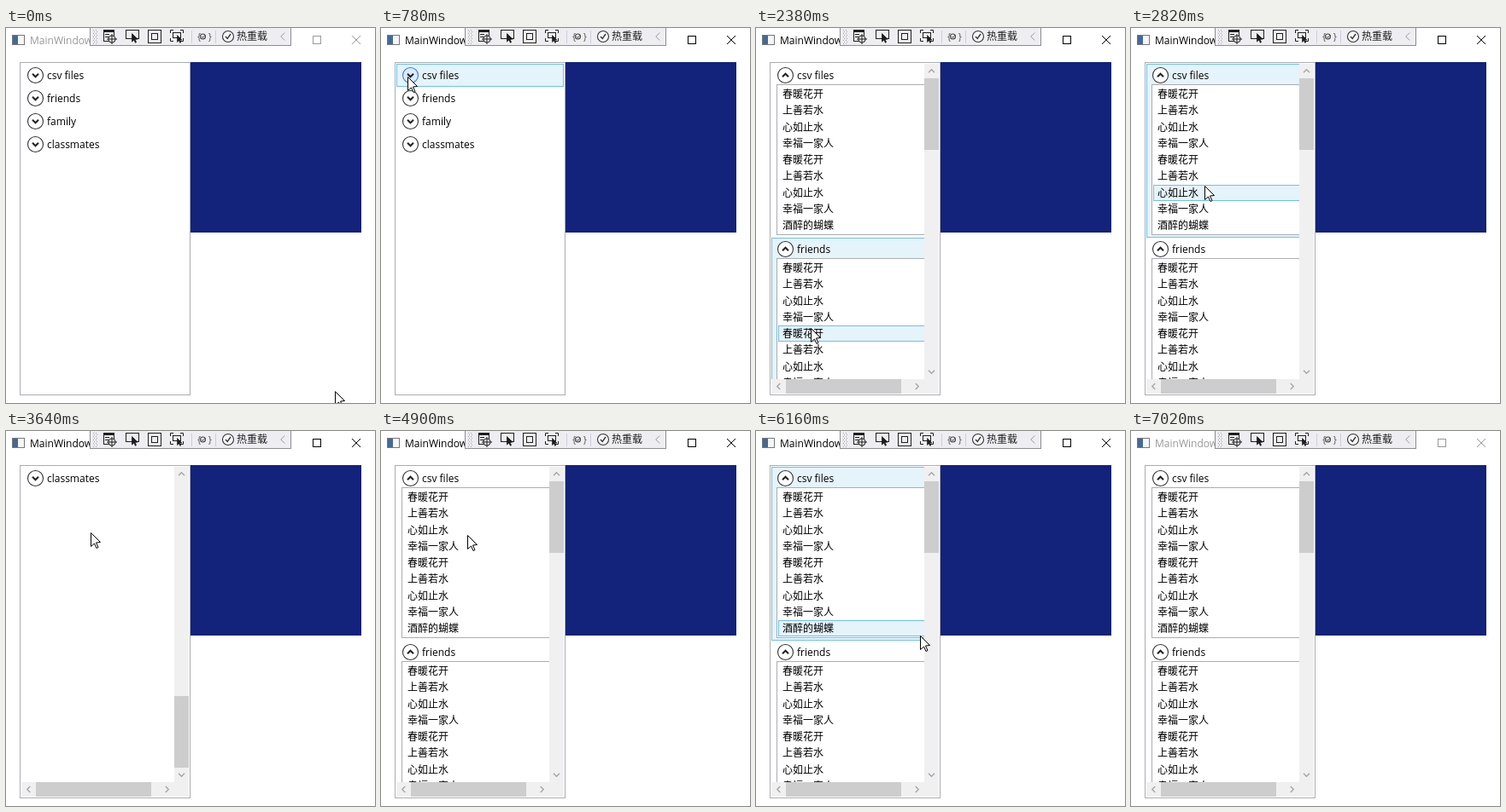
These frames come from a looping animation (432x440 px, 7070 ms). An HTML page with a canvas:

```html
<!DOCTYPE html>
<html lang="zh">
<head>
<meta charset="utf-8">
<title>Expanding lists</title>
<style>
  html, body { margin: 0; width: 100%; height: 100%; overflow: hidden; background: #fff; }
  canvas { display: block; width: 432px; height: 440px; }
</style>
</head>
<body>
<canvas id="stage"></canvas>
<script>
const W = 432, H = 440, LOOP = 7070;
const canvas = document.getElementById('stage');
const ctx = canvas.getContext('2d');
const dpr = window.devicePixelRatio || 1;
canvas.width = W * dpr;
canvas.height = H * dpr;

const LATIN = '12px "Open Sans", sans-serif';
const HAN = '12px "Noto Sans CJK SC", "Noto Sans CJK", sans-serif';
const INK = '#1e1e1e', EDGE = '#abadb3';
const GROUPS = ['csv files', 'friends', 'family', 'classmates'];
const NAMES = ['春暖花开', '上善若水', '心如止水', '幸福一家人'];
const ROWS = [...NAMES, ...NAMES, '酒醉的蝴蝶'];

const LEFT = 18, TOP = 42, RIGHT = 214, BOTTOM = 429;
const BAR = 17, CLOSED = 27, OPEN = 204, ROW = 19.28;
const UP = 0, EAST = Math.PI / 2, DOWN = Math.PI, WEST = -EAST;

// Pointer moves: begin, end, x, y
const MOVES = [
  [20, 500, 31, 57],
  [930, 1350, 37, 265],
  [2040, 2380, 64, 352],
  [2380, 2750, 86, 187],
  [2750, 3370, 99, 119],
  [4250, 4340, 101, 122],
  [4930, 5090, 101, 129],
  [5960, 6460, 357, 442]
];

const between = (t, a, b) => t >= a && t < b;

function pointerAt(t) {
  let x = 385, y = 426;
  for (const [begin, end, toX, toY] of MOVES) {
    const u = Math.min(1, Math.max(0, (t - begin) / (end - begin)));
    const k = u * u * (3 - 2 * u);
    x += (toX - x) * k;
    y += (toY - y) * k;
  }
  return { x: Math.round(x), y: Math.round(y) };
}

function stateAt(t) {
  return {
    active: between(t, 680, 7020),
    open: [t >= 850, t >= 1520, false, false],
    bars: t >= 1520,
    first: between(t, 3640, 4900) || between(t, 5330, 5610) ? 3 : 0,
    pressed: between(t, 720, 850) || between(t, 1450, 1520),
    // Hover lags one beat behind a wheel scroll
    stale: between(t, 4900, 4930) || between(t, 5610, 5640),
    pointer: pointerAt(t)
  };
}

function fill(color, x, y, w, h) {
  ctx.fillStyle = color;
  ctx.fillRect(x, y, w, h);
}

function frame(color, x, y, w, h) {
  ctx.strokeStyle = color;
  ctx.lineWidth = 1;
  ctx.strokeRect(x + 0.5, y + 0.5, w - 1, h - 1);
}

function line(color, width, ...p) {
  ctx.strokeStyle = color;
  ctx.lineWidth = width;
  ctx.beginPath();
  for (let i = 0; i < p.length; i += 2) ctx.lineTo(p[i], p[i + 1]);
  ctx.stroke();
}

function circle(x, y, r, color, inside = 'transparent') {
  ctx.beginPath();
  ctx.arc(x, y, r, 0, Math.PI * 2);
  ctx.fillStyle = inside;
  ctx.fill();
  ctx.strokeStyle = color;
  ctx.lineWidth = 1.1;
  ctx.stroke();
}

function text(str, x, y, font, color = '#000') {
  ctx.font = font;
  ctx.fillStyle = color;
  ctx.fillText(str, x, y);
}

function chevron(x, y, turn, size, color, width) {
  ctx.save();
  ctx.translate(x, y);
  ctx.rotate(turn);
  line(color, width, -size, size / 2, 0, -size / 2, size, size / 2);
  ctx.restore();
}

function check(x, y, size, color) {
  line(color, size / 2.2, x - size, y, x - size / 4, y + size * 0.8, x + size, y - size);
}

function arrow(x, y, scale, inside) {
  ctx.save();
  ctx.translate(x + 0.5, y + 0.5);
  ctx.scale(scale, scale);
  ctx.beginPath();
  for (const [px, py] of [[0, 0], [0, 16], [4, 12.5], [6.5, 18], [8.5, 17], [6, 11.5], [11, 11]])
    ctx.lineTo(px, py);
  ctx.closePath();
  ctx.fillStyle = inside;
  ctx.fill();
  ctx.strokeStyle = '#000';
  ctx.lineWidth = 1;
  ctx.stroke();
  ctx.restore();
}

function highlight(x, y, w, h) {
  fill('#e5f3fb', x, y, w, h);
  frame('#70c0e7', x, y, w, h);
}

function drawTitle(active) {
  const ink = active ? '#000' : '#999';
  fill('#f4f6f8', 8, 9, 13, 10);
  fill('#446a96', 8, 9, 6, 10);
  frame('#777', 7, 8, 15, 12);
  text('MainWindow', 28, 19, LATIN, ink);
  frame(ink, 359, 9, 10, 10);
  line(ink, 1, 405, 9, 415, 19);
  line(ink, 1, 415, 9, 405, 19);
}

function drawToolbar() {
  fill('#eeeef2', 98, 0, 236, 21);
  frame('#8c8c94', 98, -1, 236, 22);
  for (let i = 0; i < 9; i++)
    for (let x = 102 + i % 2; x < 108; x += 3) fill('#a0a0a8', x, 2 + i * 2, 1, 1);

  // Tree inspector
  frame(INK, 114, 3, 13, 13);
  fill(INK, 114, 2, 13, 3);
  for (const y of [7, 10]) fill(INK, 116, y, 5, 1);
  circle(124, 13, 4, INK, '#eeeef2');
  fill(INK, 118, 12.5, 12, 1);
  fill(INK, 123.5, 7, 1, 12);

  // Element picker
  frame(INK, 140, 2, 16, 11);
  arrow(147, 6, 0.6, INK);

  // Layout outline
  frame(INK, 166, 2, 16, 16);
  frame(INK, 170, 6, 8, 8);

  // Focus tracker
  for (const s of [-1, 1])
    for (const v of [-1, 1])
      line(INK, 1, 200 + 4 * s, 9 + 6.5 * v, 200 + 7.5 * s, 9 + 6.5 * v, 200 + 7.5 * s, 9 + 3 * v);
  frame(INK, 195, 5, 10, 7);
  arrow(200, 8, 0.5, INK);

  for (const x of [217, 245]) fill('#cccedb', x, 3, 1, 15);
  text('{   }', 224, 14, '11px "Open Sans", sans-serif', '#555');
  circle(230.5, 10, 3, '#444');
  check(231, 10, 2, '#444');
  circle(260, 10, 6.5, '#333', '#f7f7f9');
  check(260, 10, 3, '#333');
  text('热重载', 270, 14, HAN, INK);
  chevron(324, 10, WEST, 4.5, '#999', 1);
}

function drawToggle(y, open, hover, pressed) {
  const ring = pressed ? '#3c77dd' : hover ? '#5593ff' : '#333';
  const inside = pressed ? '#d9ecff' : hover ? '#f3f9ff' : '#fff';
  circle(34.5, y, 9, ring, inside);
  chevron(34.5, y, open ? UP : DOWN, 3.5, '#222', 2);
}

function drawList(top, hoverRow) {
  fill('#fff', 24, top + 24, 180, 177);
  frame(EDGE, 24, top + 24, 180, 177);
  ROWS.forEach((name, i) => {
    const y = Math.round(top + 26 + i * ROW);
    if (i === hoverRow) highlight(26, y, 176, 19);
    text(name, 31, y + 14, HAN);
  });
}

function drawScrollbars(first) {
  const x = RIGHT - BAR, y = BOTTOM - BAR, mid = BAR / 2;
  const thumb = (y - TOP - 2 * BAR) / GROUPS.length;
  fill('#f0f0f0', x, TOP, BAR, BOTTOM - TOP);
  fill('#f0f0f0', LEFT, y, x - LEFT, BAR);
  fill('#cdcdcd', x, TOP + BAR + first * thumb, BAR, thumb);
  fill('#cdcdcd', LEFT + BAR, y, 135, BAR);
  const tip = (cx, cy, turn) => chevron(cx, cy, turn, 3.5, '#a3a3a3', 1.3);
  tip(x + mid, TOP + mid, UP);
  tip(x + mid, y - mid, DOWN);
  tip(LEFT + mid, y + mid, WEST);
  tip(x - mid, y + mid, EAST);
}

function drawPanel(s) {
  frame(EDGE, 16, 40, 200, 391);
  const trim = s.bars ? BAR : 0;
  const right = RIGHT - trim, bottom = BOTTOM - trim;
  const { x, y } = s.pointer;
  const inView = !s.stale && between(x, LEFT, right) && between(y, TOP, bottom);

  ctx.save();
  ctx.beginPath();
  ctx.rect(LEFT, TOP, right - LEFT, bottom - TOP);
  ctx.clip();
  let top = TOP;
  for (let i = s.first; i < GROUPS.length; i++) {
    const h = s.open[i] ? OPEN : CLOSED;
    const hover = inView && between(y, top, top + h);
    const onHeader = hover && y < top + 24;
    if (hover) highlight(LEFT, top, RIGHT - LEFT, h);
    drawToggle(top + 13.5, s.open[i], onHeader, onHeader && s.pressed);
    text(GROUPS[i], 48, top + 18, LATIN);
    if (s.open[i]) {
      const onRows = hover && x >= 26;
      drawList(top, onRows ? Math.floor((y - top - 26) / ROW) : -1);
    }
    top += h;
  }
  ctx.restore();
  if (s.bars) drawScrollbars(s.first);
}

function draw(t) {
  const s = stateAt(t);
  ctx.setTransform(dpr, 0, 0, dpr, 0, 0);
  fill('#fff', 0, 0, W, H);
  drawTitle(s.active);
  drawToolbar();
  fill('#13227a', 216, 40, 200, 200);
  drawPanel(s);
  arrow(s.pointer.x, s.pointer.y, 1, '#fff');
}

const start = performance.now();
function tick() {
  draw((performance.now() - start) % LOOP);
  requestAnimationFrame(tick);
}
tick();
</script>
</body>
</html>
```
